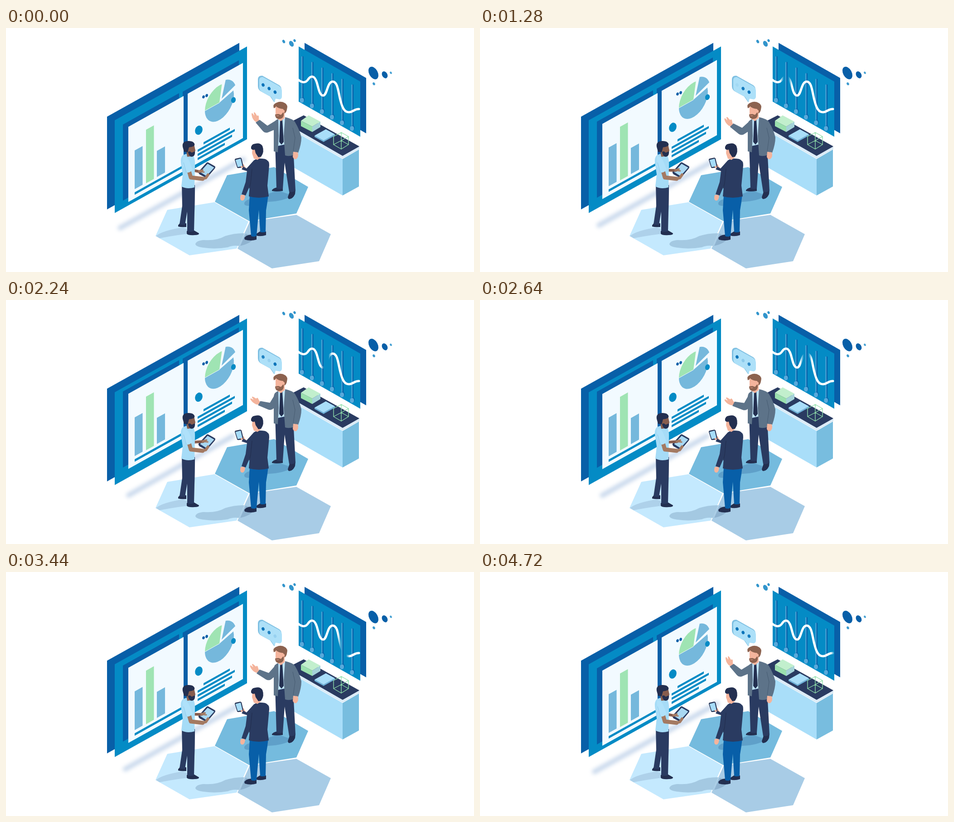
These frames come from a looping animation (1033x542 px, 4800 ms). An HTML page with a canvas:

```html
<!DOCTYPE html>
<html lang="en">
<head>
<meta charset="utf-8">
<title>Team meeting</title>
<style>
html, body { margin: 0; width: 100%; height: 100%; overflow: hidden; background: #fff; }
canvas { display: block; width: 1033px; height: 542px; }
</style>
</head>
<body>
<canvas id="stage" width="1033" height="542"></canvas>
<script>
const ctx = document.getElementById('stage').getContext('2d');
const LOOP = 4800, STEP = 80, SLOPE = 0.5616;
const TEAL = '#048bc5', DEEP = '#085fa8', SKY = '#75b8dc', PALE = '#a9def9', ICE = '#f2faff',
  GREEN = '#9fe4b3', NAVY = '#2a3b61', INK = '#232f50', GREY = '#5d7389',
  SKIN = '#f4b49c', BROWN = '#8c624f', TAN = '#a47a62', DARKSKIN = '#875d4e';

function fill(color, d) {
  ctx.fillStyle = color;
  ctx.fill(new Path2D(d));
}

function line(color, width, d) {
  ctx.strokeStyle = color;
  ctx.lineWidth = width;
  ctx.lineCap = ctx.lineJoin = 'round';
  ctx.stroke(new Path2D(d));
}

function oval(color, x, y, rx, ry = rx, tilt = 0) {
  ctx.fillStyle = color;
  ctx.beginPath();
  ctx.ellipse(x, y, rx, ry, tilt, 0, Math.PI * 2);
  ctx.fill();
}

// Upright wall panel: slanted top and bottom, vertical sides.
function panel(color, x, y, w, h, slope = -SLOPE) {
  fill(color, `M${x} ${y}l${w} ${w * slope}v${h}l${-w} ${-w * slope}z`);
}

function slice(color, from, to, dx = 0, dy = 0) {
  ctx.save();
  ctx.transform(1, -0.56, 0, 1.2, 471 + dx, 166 + dy);
  ctx.fillStyle = color;
  ctx.beginPath();
  ctx.moveTo(0, 0);
  ctx.arc(0, 0, 32, from * Math.PI / 180, to * Math.PI / 180);
  ctx.fill();
  ctx.restore();
}

function floorShadow(k) {
  ctx.save();
  ctx.filter = 'blur(4px)';
  line('#cbdaed', 11, `M${252 + 20 * k} ${444 - 11 * k}L${524 - 25 * k} ${292 + 11 * k}`);
  ctx.restore();
}

function bigBoard(k) {
  panel(DEEP, 223, 197, 292, 206);
  panel(TEAL, 240, 205, 292, 206);
  ctx.save();
  ctx.translate(0, -12 * k);
  panel(DEEP, 258, 214.5, 124, 169);
  panel(DEEP, 390, 141.5, 124, 169);
  panel(ICE, 270, 219.5, 122, 167);
  panel(ICE, 401, 146, 122, 167);

  panel(SKY, 284, 272, 17.5, 86);
  panel(GREEN, 309, 226, 17.5, 119);
  panel(SKY, 333, 273, 18, 58);
  panel(TEAL, 284, 365, 108, 5.5);

  slice(SKY, -15, 180);
  slice(GREEN, 180, 280);
  slice(SKY, -74, -20, 5, -9);
  line(ICE, 1, 'M471 166L439 184');
  oval(TEAL, 502, 160, 5, 6.5, 0.3);
  oval(DEEP, 436, 153, 2.8, 3.4, 0.3);
  oval(DEEP, 443, 150, 2.8, 3.6, 0.3);
  oval(TEAL, 425.5, 227, 8, 10.5, 0.35);
  panel(TEAL, 436, 253.7, 58, 5);
  [82, 76, 60].forEach((w, i) => panel(TEAL, 423, 270.2 + 9.2 * i, w, 5));
  ctx.restore();
}

function sliderBoard(t) {
  panel(DEEP, 659, 33, 136, 123, 0.574);
  panel(TEAL, 646, 41, 136, 122.5, 0.574);
  for (let i = 0; i < 6; i++) {
    const x = 654 + 22.1 * i, y = 64 + 12.5 * i;
    line(DEEP, 2.5, `M${x + 1.3} ${y}v91`);
    line('#4fa4d5', 2.2, `M${x - 1} ${y}v91`);
    oval(DEEP, x + 0.5, y + 95.5, 4.5, 5.5);
    oval('#58aadb', x - 0.8, y + 96.5, 4.5, 5.5);
  }
  // A soft-edged gap sweeps along the curve.
  const gap = 625 + 0.0325 * t;
  const g = ctx.createLinearGradient(gap - 4, 0, gap + 22, 0);
  g.addColorStop(0, '#fff');
  g.addColorStop(0.3, '#fff0');
  g.addColorStop(0.7, '#fff0');
  g.addColorStop(1, '#fff');
  ctx.save();
  ctx.clip(new Path2D('M646 41L782 119V242L646 164Z'));
  line(g, 5, 'M644 114C654 123 662 122 667 114C673 105 681 105 686 121C690 134 692 150 700 150' +
    'C709 150 709 119 721 119C732 119 733 140 738 160C743 180 748 187 757 187C766 187 768 180 779 180');
  ctx.restore();
}

function floatingDots() {
  oval('#3295cc', 613, 30, 2.8, 4, -0.5);
  oval('#3295cc', 630, 35, 4.6, 6.8, -0.5);
  oval('#3295cc', 637, 28, 2.5, 3.2, -0.5);
  oval(DEEP, 811, 100, 9.5, 15, -0.5);
  oval(DEEP, 836, 104, 5.8, 8.2, -0.5);
  oval('#4aa3d4', 849.5, 99.5, 2.2, 2.8, -0.5);
  oval('#3d9bd0', 812, 124, 2.6, 3.3, -0.5);
}

function bubble(t) {
  fill('#7fc0e2', 'M556 113Q557 105 566 106L603 127Q609 131 608 139V152Q608 159 600 157L594 156L592 165L583 152L563 141Q556 137 556 129Z');
  fill('#ade0f8', 'M559 115Q560 108 567 109L603 129Q609 133 609 140V153Q608 160 601 158L595 157L593 165L585 153L565 142Q559 139 559 131Z');
  for (let i = 0; i < 3; i++) {
    const away = Math.abs(t - 1200 * (i + 1)) / 1200;
    ctx.globalAlpha = Math.min(1, away);
    oval('#0b74ba', 567.5 + 13.2 * i, 126.5 + 8 * i, 3.2, 3.9, -0.4);
  }
  ctx.globalAlpha = 1;
}

function desk() {
  fill(PALE, 'M625 223L743 291V372L625 304Z');
  fill('#78bddf', 'M743 291L779 270V352L743 372Z');
  fill('#dcebf6', 'M620 213L657 194L780 264V269L743 290L620 220Z');
  fill(NAVY, 'M620 213L657 194L780 263L743 284Z');
  fill('#c2efcd', 'M651 206L668 194L694 208L676 219Z');
  fill('#9be0ae', 'M651 206L676 219V231L651 218Z');
  fill('#a5d3d9', 'M676 219L694 208V220L676 231Z');
  fill('#6fb4db', 'M681 239L701 250L726 236V239L701 253L681 242Z');
  fill(PALE, 'M681 239L706 225L726 236L701 250Z');
  line('#90dfaa', 1.4, 'M740 232L756 241V259L740 269L723 259V241ZL740 250L756 241M740 250V269M740 250V232M740 250L723 259M740 250L756 259');
}

function tiles() {
  fill('#75bbde', 'M461 386L488 327L592 309L667 353L641 412L537 429Z');
  fill('#c4e9fe', 'M330 462L356 404L460 387L535 430L509 490L405 505Z');
  fill('#a8cce6', 'M511 490L538 430L641 415L717 458L691 518L587 534Z');
  fill('#aed1ea', 'M331 462Q345 450 390 443L420 455Q380 459 339 467Z');
  fill('#a4c9e2', 'M418 480Q420 472 437 471Q465 473 484 462Q506 455 526 456L514 484Q500 482 490 487Q462 492 437 488Q419 486 418 480Z');
  fill('#8fb3d0', 'M517 484L529 457L551 464Q540 479 517 484Z');
  fill('#5fa0c9', 'M526 389Q528 380 551 378L600 361L633 372Q612 385 580 386Q552 395 533 395Q525 394 526 389Z');
}

function presenter(wave) {
  fill(INK, 'M587 360Q590 356 598 354L611 354V362Q596 364 587 362Z');
  fill(INK, 'M626 363L639 359L638 369Q633 380 625 380Q620 378 624 370Z');
  fill(NAVY, 'M594 255H632L635 285L639 361Q633 366 625 364L615 299L611 357Q602 359 597 356Z');

  ctx.save();
  ctx.translate(603, 211);
  ctx.rotate(-wave * 29 * Math.PI / 180);
  ctx.translate(-603, -211);
  fill(SKIN, 'M552 209L548 206Q542 199 542 190Q544 188 546 192L548 195L547 188Q549 186 551 190L554 195Q558 193 558 197L558 203L560 206Z');
  fill(GREY, 'M551 210L560 204L577 217L598 204Q606 203 607 212L602 222L578 232Q572 234 567 229Z');
  ctx.restore();

  fill('#bfe5fa', 'M599 203L617 201L619 258L600 262Z');
  fill(INK, 'M605 205L610 204L613 253L608 259L603 253Z');
  fill(GREY, 'M601 202Q592 205 591 214V274L600 276L602 240Z');
  fill(GREY, 'M616 198Q634 202 638 209Q648 226 652 243Q652 258 645 277L634 275L635 282Q625 286 616 283L613 240Z');
  line('#4b6076', 1.2, 'M633 222L638 244L634 273');
  fill(SKIN, 'M634 275L644 276Q647 286 641 291Q635 293 633 286Z');

  fill(SKIN, 'M595 175H615V200L607 207L601 203L595 196Z');
  fill(BROWN, 'M594 192L601 191L607 193L613 186V194Q611 203 601 202Q594 201 594 192Z');
  fill(BROWN, 'M591 178Q588 169 597 166Q607 161 616 167Q623 171 620 181Q619 187 615 190L612 180Q601 179 596 174Q594 178 591 178Z');
  oval(SKIN, 613, 185, 2, 3);
  line('#e9a08c', 1.2, 'M597 195h5');
}

function listener() {
  fill(INK, 'M526 466Q530 460 541 459L553 460V470Q540 474 527 470Z');
  fill(INK, 'M551 458L562 451L574 452V460Q562 464 552 461Z');
  fill(DEEP, 'M538 370H579Q577 388 574 405L573 453Q566 455 561 453L558 404L553 462Q546 465 541 462L536 405Z');
  fill(SKIN, 'M518 371L527 370Q529 378 524 383Q517 385 517 377Z');
  fill(SKIN, 'M518 304L524 302L528 309L531 314L522 313Z');
  fill(INK, 'M505 293Q505 290 508 290L517 288Q519 288 520 290L524 307Q524 309 522 310L513 311Q510 311 510 309Z');
  fill('#a6dcf8', 'M506.5 293L518 290L522 307L511.5 309Z');
  fill(SKIN, 'M521 306Q517 306 518 309L525 312Z');
  fill(NAVY, 'M524 308L531 312L547 294Q556 288 572 291Q582 295 581 305L577 350L580 374Q558 380 536 374L538 351L529 372L520 369L529 342L532 318L520 314Z');
  line(INK, 1.2, 'M543 313L540 344L537 356');
  fill(SKIN, 'M544 268H562V288L555 293L547 290L543 278Z');
  fill(INK, 'M541 268Q540 258 550 257Q561 254 566 262Q571 275 563 286L557 287L551 278L549 270Q544 272 541 268Z');
}

function tabletUser(k) {
  fill(INK, 'M380 438L386 431L398 434V442Q387 443 380 441Z');
  fill(INK, 'M399 451L414 449L426 456Q427 460 416 460Q402 461 399 457Z');
  fill(NAVY, 'M388 346L417 349Q417 385 416 410L415 451Q406 455 400 451L400 408L395 437Q389 438 383 436L389 395Z');

  fill(NAVY, 'M425 322Q424 319 427 317L442 300Q444 297 447 299L461 307Q463 309 461 312L445 331Q443 334 440 332L427 325Z');
  fill('#a9d8f2', 'M428.5 320L445 301.5L459.5 310L442.5 329Z');

  // Far hand slides over the screen.
  const x = 437 + 9 * k, y = 318 - 5 * k;
  line(DARKSKIN, 6, `M412 316L${x - 10} ${y + 1}`);
  line(TAN, 4, `M${x - 11} ${y}L${x - 3} ${y - 2}`);
  line(TAN, 3, `M${x - 11} ${y + 1}L${x} ${y + 2}`);

  fill('#a6dcf7', 'M390 283Q401 276 412 282Q418 288 417 307L416 354Q400 359 387 352L390 325L386 299Q385 288 390 283Z');
  line(TAN, 9, 'M404 318L408 332L434 335');
  line(TAN, 6, 'M432 335L441 333L446 326');
  fill('#afe1fa', 'M391 284Q400 285 405 297L412 315Q406 322 399 321L390 305Z');
  line('#8dcbeb', 1, 'M398 321L392 299');

  fill(DARKSKIN, 'M396 262L415 258L418 272L415 281L410 285L400 286Z');
  fill(INK, 'M390 264Q388 252 401 251Q413 250 416 257Q418 262 410 264L404 265L401 276L393 275Z');
  fill(INK, 'M402 275L406 274L410 277L417 274Q418 286 409 286Q403 284 402 275Z');
}

function draw(t) {
  const rise = 1 - Math.abs(t - 2400) / 2400;
  const peak = 2600;
  const u = t < peak ? t / peak : (LOOP - t) / (LOOP - peak);
  const wave = Math.pow((1 - Math.cos(Math.PI * u)) / 2, 1.4);

  ctx.fillStyle = '#fff';
  ctx.fillRect(0, 0, 1033, 542);
  floorShadow(rise);
  bigBoard(rise);
  sliderBoard(t);
  floatingDots();
  desk();
  tiles();
  bubble(t);
  presenter(wave);
  listener();
  tabletUser(rise);
}

const start = performance.now();
function tick() {
  const t = (performance.now() - start) % LOOP;
  draw(Math.floor(t / STEP) * STEP);
  requestAnimationFrame(tick);
}
tick();
</script>
</body>
</html>
```
